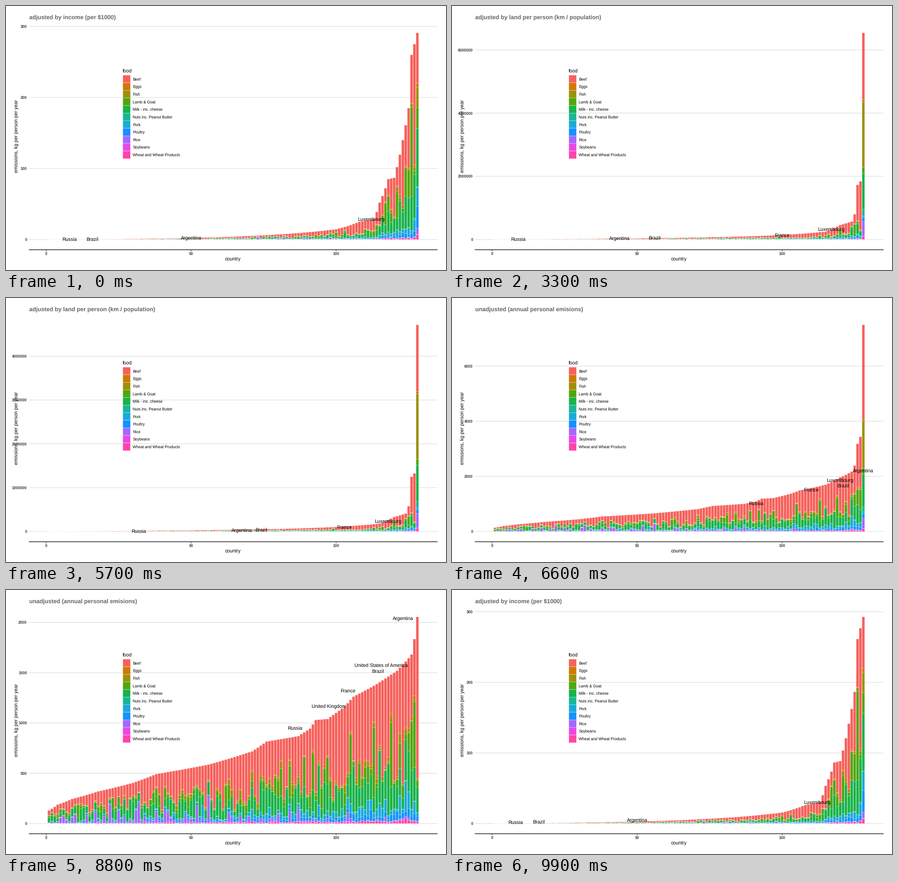
Write a matplotlib script that moves like this. It is 966x580 px and loops after 10000 ms.

```python
import math

import numpy as np
import matplotlib.pyplot as plt
from matplotlib.animation import FuncAnimation
from matplotlib.collections import LineCollection, PolyCollection
from matplotlib.patches import Rectangle

W, H, DPI = 966, 580, 100
PT = 72 / DPI
N = 128
X0, DX = 88.0, 6.368          # pixel of rank 0, pixels per rank
Y0, SPAN = 513.0, 454.0       # pixel of zero, height of the tallest bar
LEFT, RIGHT = 50.8, 946.8

plt.rcParams["font.family"] = "Liberation Sans"
plt.rcParams["text.hinting"] = "none"

FOODS = [
    ("Beef", "#f7605b"), ("Eggs", "#d07806"), ("Fish", "#9c9108"),
    ("Lamb & Goat", "#52a60b"), ("Milk - inc. cheese", "#19b34a"),
    ("Nuts inc. Peanut Butter", "#18b797"), ("Pork", "#19aada"),
    ("Poultry", "#1490ff"), ("Rice", "#a268ff"), ("Soybeans", "#e947e8"),
    ("Wheat and Wheat Products", "#ff44a8"),
]
TITLES = ["adjusted by income (per $1000)",
          "adjusted by land per person (km / population)",
          "unadjusted (annual personal emisions)"]

# country: rank in each of the three views
RANKS = {
    "Argentina": (50, 44, 128), "Brazil": (16, 56, 121),
    "France": (15, 100, 110), "Luxembourg": (112, 117, 120),
    "Russia": (8, 9, 91), "United Kingdom": (14, 116, 103),
    "United States of America": (4, 60, 123),
}

rank = np.arange(1, N + 1)


def curve(points):
    """Totals by rank, growing exponentially between key points."""
    return np.exp(np.interp(rank, list(points), np.log(list(points.values()))))


TOTALS = [
    curve({1: .03, 10: .1, 30: 1, 70: 5, 100: 14.5, 108: 25, 113: 29, 115: 52,
           118: 85, 120: 87, 123: 140, 125: 185, 126: 260, 128: 291}),
    curve({1: 1e3, 20: 1.2e4, 40: 3e4, 84: 9e4, 100: 1.44e5, 115: 2.5e5,
           120: 4.6e5, 124: 5.7e5, 125: 8e5, 126: 1.73e6, 127: 1.84e6,
           128: 6.54e6}),
    curve({1: 139, 4: 200, 9: 261, 18: 341, 30: 432, 38: 525, 56: 625, 71: 765,
           76: 869, 87: 927, 91: 1007, 93: 1098, 97: 1108, 103: 1241,
           106: 1345, 113: 1459, 121: 1614, 126: 1775, 127: 1938, 128: 2173}),
]

# shares of the tallest bar, wheat up to eggs
TALLEST = [
    (.024, .002, .029, .105, .093, .002, .282, .1, .1, .02),
    (.016, .001, .07, .02, .006, .033, .175, .029, .317, .011),
    (.007, .001, .005, .021, .016, .001, .124, .03, .005, .006),
]


def stacks(total, tallest, seed):
    """Amounts per rank, wheat first and beef last."""
    rng = np.random.default_rng(seed)
    t, one = rank / N, np.ones(N)
    mean = np.array([.014 * one, .002 * one, .22 * (1 - t) ** 2 + .008,
                     .035 * one, .01 + .06 * t, .004 * one, .29 - .1 * t,
                     .09 + .15 * t ** 12, .05 - .03 * t, .014 * one])
    shape = np.array([6, 2, .5, 4, 2.5, 2, 5, .7, 1.2, 5])[:, None]
    share = mean * rng.gamma(shape, 1 / shape, (10, N))
    share *= np.minimum(1, .74 / share.sum(0))
    share[:, -1] = tallest
    return (np.vstack([share, 1 - share.sum(0)]) * total).T


VIEWS = [stacks(v, p, 21 + k) for k, (v, p) in enumerate(zip(TOTALS, TALLEST))]
MOVES = [(16, 33), (50, 67), (84, 100)]   # first and last step of each change


def phase(i):
    for s, (a, b) in enumerate(MOVES):
        if i < a:
            return s, 0.0
        if i < b:
            return s, (i - a) / (b - a)


def cubic(u):
    return 4 * u ** 3 if u < .5 else 1 - 4 * (1 - u) ** 3


def breaks(lo, hi, m=5):
    """Extended Wilkinson axis breaks."""
    best, found = -9, []
    for n, q in enumerate((1, 5, 2, 2.5, 4, 3)):
        for k in range(2, 11):
            z0 = math.ceil(math.log10((hi - lo) / (k + 1) / q))
            for z in (z0, z0 + 1):
                step = q * 10.0 ** z
                first = math.floor(hi / step) - (k - 1)
                for start in range(first, math.ceil(lo / step) + 1):
                    a, b = start * step, (start + k - 1) * step
                    simple = (a <= 0 <= b) - n / 5
                    cover = 1 - .5 * ((hi - b) ** 2 + (lo - a) ** 2) \
                        / (.1 * (hi - lo)) ** 2
                    r = (k - 1) / (b - a)
                    rt = (m - 1) / (max(b, hi) - min(a, lo))
                    dense = 2 - max(r / rt, rt / r)
                    score = .25 * simple + .2 * cover + .5 * dense
                    if score > best:
                        best = score
                        found = [a + j * step for j in range(k)]
    return [v for v in found if lo <= v <= hi]


fig = plt.figure(figsize=(W / DPI, H / DPI), dpi=DPI, facecolor="white")
ax = fig.add_axes([0, 0, 1, 1])
ax.set_xlim(0, W)
ax.set_ylim(H, 0)
ax.axis("off")


def text(x, y, s, px, color="black", **kw):
    kw.setdefault("va", "baseline")
    return ax.text(x, y, s, fontsize=px * PT, color=color, zorder=5, **kw)


grid = LineCollection([], colors="#d8d8d8", linewidths=1.05 * PT, zorder=1,
                      snap=False)
ax.add_collection(grid)

bars = PolyCollection([], facecolors=[c for _, c in FOODS[::-1]] * N,
                      edgecolors="white", linewidths=.25 * PT, zorder=2,
                      snap=False)
ax.add_collection(bars)

# x axis
ax.plot([LEFT, RIGHT], [535.5] * 2, color="black", lw=1.3 * PT, zorder=3,
        snap=False)
for v in (0, 50, 100):
    x = X0 + DX * v
    ax.plot([x, x], [535.5, 538.8], color="#333333", lw=1.05 * PT, zorder=3,
            snap=False)
    text(x, 547.2, str(v), 8.53, "#404040", ha="center", weight="bold")
text(498.2, 558.8, "country", 10.67, ha="center")
text(24, 286, "emissions, kg per person per year", 10.67, ha="center",
     va="center", rotation=90)

# legend
text(256.3, 146.4, "food", 10.67)
for k, (name, color) in enumerate(FOODS):
    y = 152 + 16.67 * k
    ax.add_patch(Rectangle((256.5, y), 16.6, 16.67, fc=color, ec="white",
                           lw=.4 * PT, zorder=4, snap=False))
    text(278.4, y + 11.5, name, 8.53)

title = text(50.8, 29, "", 12.8, "#666666", weight="bold", parse_math=False)
ticks = [text(46, 0, "", 8.53, "#404040", ha="right", weight="bold")
         for _ in range(10)]
labels = {c: text(0, 0, c, 10.67, ha="center") for c in RANKS}
widths = {c: t.get_window_extent().width for c, t in labels.items()}

xl = X0 + DX * (rank - .45)
xr = X0 + DX * (rank + .45)


def place_labels(s, nxt, e, to_y):
    """Later names give way to earlier ones they would overlap."""
    kept = []
    for c, t in labels.items():
        a, b = RANKS[c][s], RANKS[c][nxt]
        x = X0 + DX * (a + (b - a) * e)
        va, vb = TOTALS[s][a - 1], TOTALS[nxt][b - 1]
        y = to_y(va + (vb - va) * e)
        w = widths[c]
        free = all(abs(x - p) > (w + v) / 2 or abs(y - q) > 9.5
                   for p, q, v in kept)
        t.set_visible(free)
        t.set_position((x, y + 3.8))
        if free:
            kept.append((x, y, w))


def draw(i):
    s, u = phase(i)
    nxt, e = (s + 1) % 3, cubic(u)
    vals = VIEWS[s] * (1 - e) + VIEWS[nxt] * e
    top = vals.sum(1).max()

    def to_y(v):
        return Y0 - v / top * SPAN

    cum = np.cumsum(vals, axis=1)
    hi, lo = to_y(cum), to_y(cum - vals)
    quads = np.empty((N, len(FOODS), 4, 2))
    quads[:, :, (0, 3), 0] = xl[:, None, None]
    quads[:, :, (1, 2), 0] = xr[:, None, None]
    quads[:, :, :2, 1] = lo[:, :, None]
    quads[:, :, 2:, 1] = hi[:, :, None]
    bars.set_verts(quads.reshape(-1, 4, 2))

    marks = breaks(-.05 * top, 1.05 * top)
    grid.set_segments([[(LEFT, to_y(v)), (RIGHT, to_y(v))] for v in marks])
    for k, t in enumerate(ticks):
        t.set_visible(k < len(marks))
        if k < len(marks):
            t.set_text(f"{abs(marks[k]):.0f}")
            t.set_y(to_y(marks[k]) + 3.1)

    title.set_text(TITLES[s if u < .5 else nxt])
    place_labels(s, nxt, e, to_y)
    return []


anim = FuncAnimation(fig, draw, frames=100, interval=100, repeat=True,
                     repeat_delay=0, blit=False, cache_frame_data=False)
plt.show()
```
